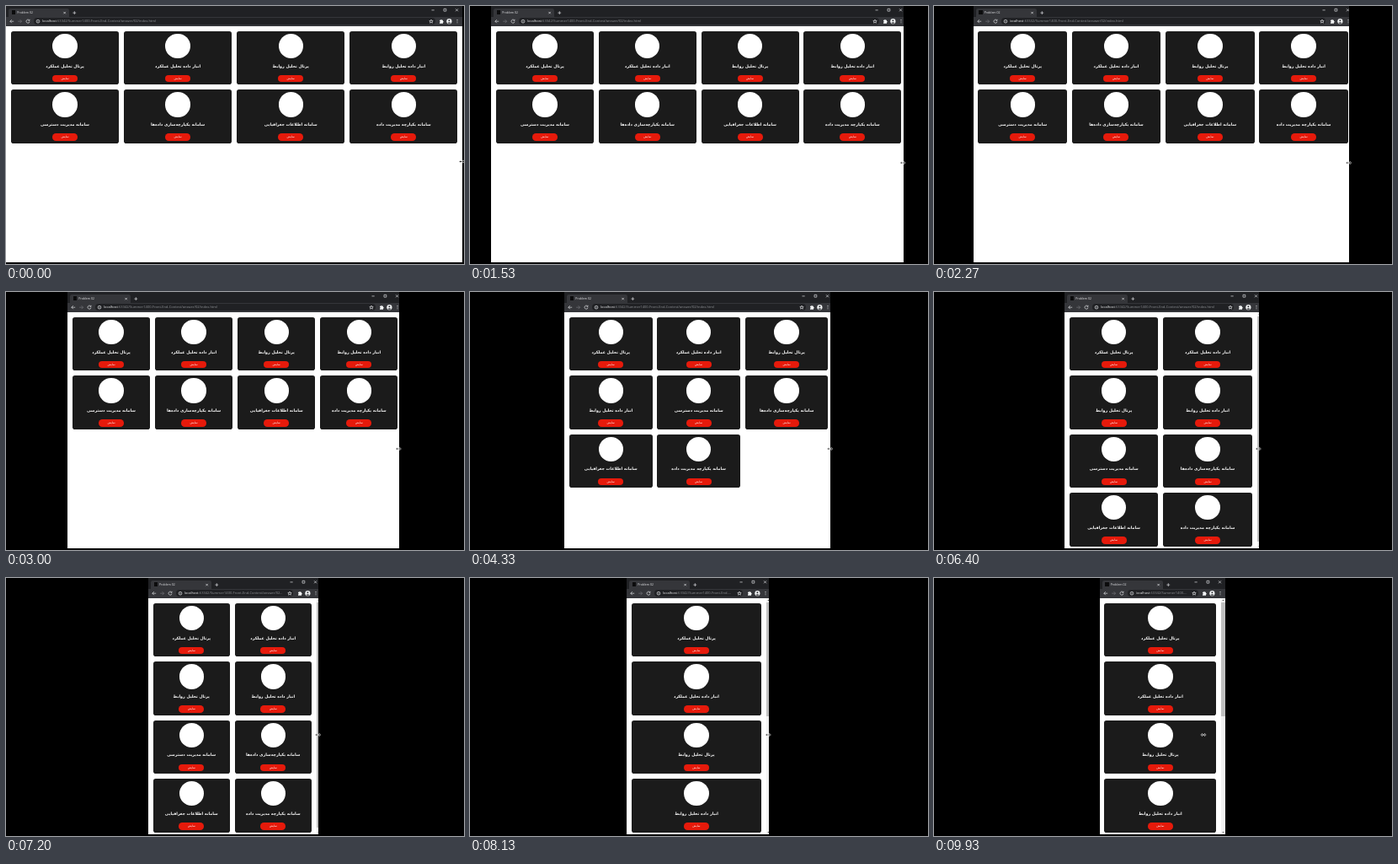
Recreate the animation shown at these times as an HTML page. Size 544 by 306 pixels, loop 9.99 s.

```html
<!DOCTYPE html>
<html lang="en">
<head>
<meta charset="utf-8">
<title>Responsive grid</title>
<style>
html, body { margin: 0; width: 100%; height: 100%; overflow: hidden; background: #000; }
#stage { position: relative; width: 544px; height: 306px; overflow: hidden; background: #000; }
#stage div, #stage svg { position: absolute; }
#win { top: 0; height: 304px; overflow: hidden; background: #fff; }
#view { left: 0; top: 0; height: 304px; font-family: "Open Sans", "Noto Sans", sans-serif; white-space: nowrap; }
#tabs { left: 0; right: 0; top: 0; height: 13.2px; background: #202124; }
#tab { left: 3px; top: 2.6px; width: 72px; height: 10.6px; border-radius: 2.4px 2.4px 0 0; background: #35363a; }
#icon { left: 3.8px; top: 2.6px; width: 4.6px; height: 4.6px; background: #0c0c0d; }
#name { left: 10.2px; top: 0; font-size: 3.5px; line-height: 10.4px; color: #e4e5e8; }
#bar { left: 0; right: 0; top: 13.2px; height: 11px; background: #35363a; }
#pill { left: 33px; right: 32.5px; top: 1.2px; height: 8px; border-radius: 4px; background: #202124; }
#url { left: 43px; right: 45px; top: 0; font-size: 4.05px; line-height: 10.2px; color: #8f9296; overflow: hidden; text-overflow: ellipsis; }
#url b { font-weight: 400; color: #f1f2f4; }
.start { left: 0; top: 0; }
.end { right: 0; top: 0; }
.line { fill: none; stroke: #e8eaed; stroke-width: .65; }
.dim { stroke: #77797d; }
.solid { fill: #f1f3f4; }
#page { left: 0; top: 24.2px; height: 280px; overflow: hidden; background: #fff; }
#grid { left: 5.9px; right: 5.9px; top: 5.8px; display: grid; gap: 5.9px; grid-auto-rows: 63.5px; }
#grid .card { position: relative; border-radius: 2.8px; background: #1b1b1b; color: #fff; text-align: center; direction: rtl; font-family: "DejaVu Sans", "Noto Sans", sans-serif; }
.logo { left: 50%; top: 2.8px; width: 29.4px; height: 29.4px; margin-left: -14.7px; border-radius: 50%; background: #fff; }
.title { left: 0; right: 0; top: 36.6px; font-size: 4.75px; font-weight: 700; line-height: 10px; }
.btn { left: 50%; top: 51.8px; width: 30px; height: 8.6px; margin-left: -15px; border-radius: 4.3px; background: #e61a0b; font-size: 3.4px; line-height: 8.4px; }
#scroll { right: 0; top: 24.2px; width: 4.9px; height: 280px; background: #f1f1f1; }
#thumb { left: 0; right: 0; top: 4.8px; background: #c1c1c1; }
#cursor { left: 0; top: 0; overflow: visible; }
</style>
</head>
<body>
<div id="stage">
  <div id="win">
    <div id="view">
      <div id="tabs">
        <div id="tab"><div id="icon"></div><div id="name">Problem 02</div></div>
        <svg width="90" height="13" class="line start">
          <path d="M68.4 6.9l2.4 2.4m0-2.4l-2.4 2.4M79.4 8.1h3.8m-1.9-1.9v3.8"/>
        </svg>
        <svg width="42" height="13" class="line end">
          <path d="M5.5 4.9h3.2M20 3.3h2.8v2.8h-2.8zM34 3.3l3 3m0-3l-3 3"/>
        </svg>
      </div>
      <div id="bar">
        <div id="pill"></div>
        <svg width="42" height="11" class="line start">
          <path d="M9.2 5.2h-4.4m2-2l-2 2l2 2"/>
          <path class="dim" d="M14.2 5.2h4.4m-2-2l2 2l-2 2"/>
          <path d="M27.6 3.9a2 2 0 1 0 .4 1.6M28 2.8v1.5h-1.5"/>
          <circle cx="38" cy="5.2" r="1.9"/>
          <path d="M38 4.9v1.4m0-2.4v.5"/>
        </svg>
        <div id="url"><b>localhost</b>:63342/Summer1400-Front-End-Contest/answer/02/index.html</div>
        <svg width="42" height="11" class="end">
          <path class="line" d="M5 3l.6 1.5l1.6.1l-1.2 1l.4 1.6l-1.4-.9l-1.4.9l.4-1.6l-1.2-1l1.6-.1z"/>
          <path class="solid" d="M15 3.7h1.2a.8.8 0 0 1 1.6 0h1.2v1.2a.8.8 0 0 1 0 1.6v1.2h-4v-1.3a.7.7 0 0 0 0-1.4z"/>
          <circle class="solid" cx="26.4" cy="5.2" r="3.1"/>
          <circle cx="26.4" cy="4.3" r="1" fill="#35363a"/>
          <path d="M24.4 6.9a2.2 1.3 0 0 1 4 0a2.6 2.6 0 0 1-4 0z" fill="#35363a"/>
          <path class="solid" d="M35.6 3.1h.8v.8h-.8zm0 1.7h.8v.8h-.8zm0 1.7h.8v.8h-.8z"/>
        </svg>
      </div>
      <div id="page"><div id="grid"></div></div>
      <div id="scroll">
        <div id="thumb"></div>
        <svg width="5" height="280" fill="#505050" class="start">
          <path d="M1.3 3l1.15-1.3L3.6 3zM1.3 277l1.15 1.3l1.15-1.3z"/>
        </svg>
      </div>
    </div>
  </div>
  <svg id="cursor" width="1" height="1">
    <path d="M-3.2 0l1.8-1.6v1.1h2.8v-1.1l1.8 1.6l-1.8 1.6v-1.1h-2.8v1.1z" fill="#000" stroke="#fff" stroke-width=".55"/>
  </svg>
</div>
<script>
const LOOP = 9990, STEP = 1000 / 15, LAG = 0.06;
const ROW = 69.4, GAP = 5.9, MIN_CARD = 85, BAR = 4.9, VIEW = 280;
const titles = [
  "پرتال تحلیل عملکرد", "انبار داده تحلیل عملکرد",
  "پرتال تحلیل روابط", "انبار داده تحلیل روابط",
  "سامانه مدیریت دسترسی", "سامانه یکپارچه&zwnj;سازی داده&zwnj;ها",
  "سامانه اطلاعات جغرافیایی", "سامانه یکپارچه مدیریت داده"
];
// seconds, left edge, right edge
const edges = [
  [0, 0, 542.3], [.5, 2.5, 539], [1, 10, 529.5], [1.53, 25, 515], [2, 37, 503],
  [3, 73, 467], [4, 104, 436.5], [4.33, 112, 428.5], [5, 126, 414.5], [6, 146, 394.5],
  [6.4, 155, 386], [7, 165, 375], [8, 184, 357], [8.13, 186, 355], [8.67, 196.5, 346]
];
// seconds, x after letting go of the edge
const release = [[8.67, 346], [9, 342], [9.73, 320]];
const $ = id => document.getElementById(id);

function at(keys, t, col) {
  if (t <= keys[0][0]) return keys[0][col];
  for (let i = 1; i < keys.length; i++) {
    const a = keys[i - 1], b = keys[i];
    if (t < b[0]) return a[col] + (b[col] - a[col]) * (t - a[0]) / (b[0] - a[0]);
  }
  return keys[keys.length - 1][col];
}

const width = t => at(edges, t, 2) - at(edges, t, 1);
const fit = w => Math.max(1, Math.min(4, Math.floor((w - GAP) / (MIN_CARD + GAP))));
const height = cols => Math.ceil(titles.length / cols) * ROW + GAP;

$("grid").innerHTML = titles.map(s =>
  `<div class="card"><div class="logo"></div><div class="title">${s}</div><div class="btn">نمایش</div></div>`
).join("");

function draw(t) {
  const left = at(edges, t, 1), right = at(edges, t, 2);
  // the layout trails the dragged edge a little
  const w = width(t - LAG);
  let inner = w, cols = fit(w);
  const scrolls = height(cols) > VIEW;
  if (scrolls) {
    inner -= BAR;
    cols = fit(inner);
  }
  $("win").style.left = left + "px";
  $("win").style.width = right - left + "px";
  $("view").style.width = w + "px";
  $("page").style.width = inner + "px";
  $("grid").style.gridTemplateColumns = `repeat(${cols}, minmax(0, 1fr))`;
  $("scroll").style.display = scrolls ? "block" : "none";
  $("thumb").style.height = (VIEW - 2 * BAR) * VIEW / height(cols) + "px";
  const x = t < release[0][0] ? right - .8 : at(release, t, 1);
  const y = 184.5 + 1.5 * Math.min(1, t);
  $("cursor").style.transform = `translate(${x}px, ${y}px)`;
}

const start = performance.now();
function tick() {
  const ms = (performance.now() - start) % LOOP;
  draw(Math.floor((ms + 5) / STEP) * STEP / 1000);
  requestAnimationFrame(tick);
}
tick();
</script>
</body>
</html>
```
